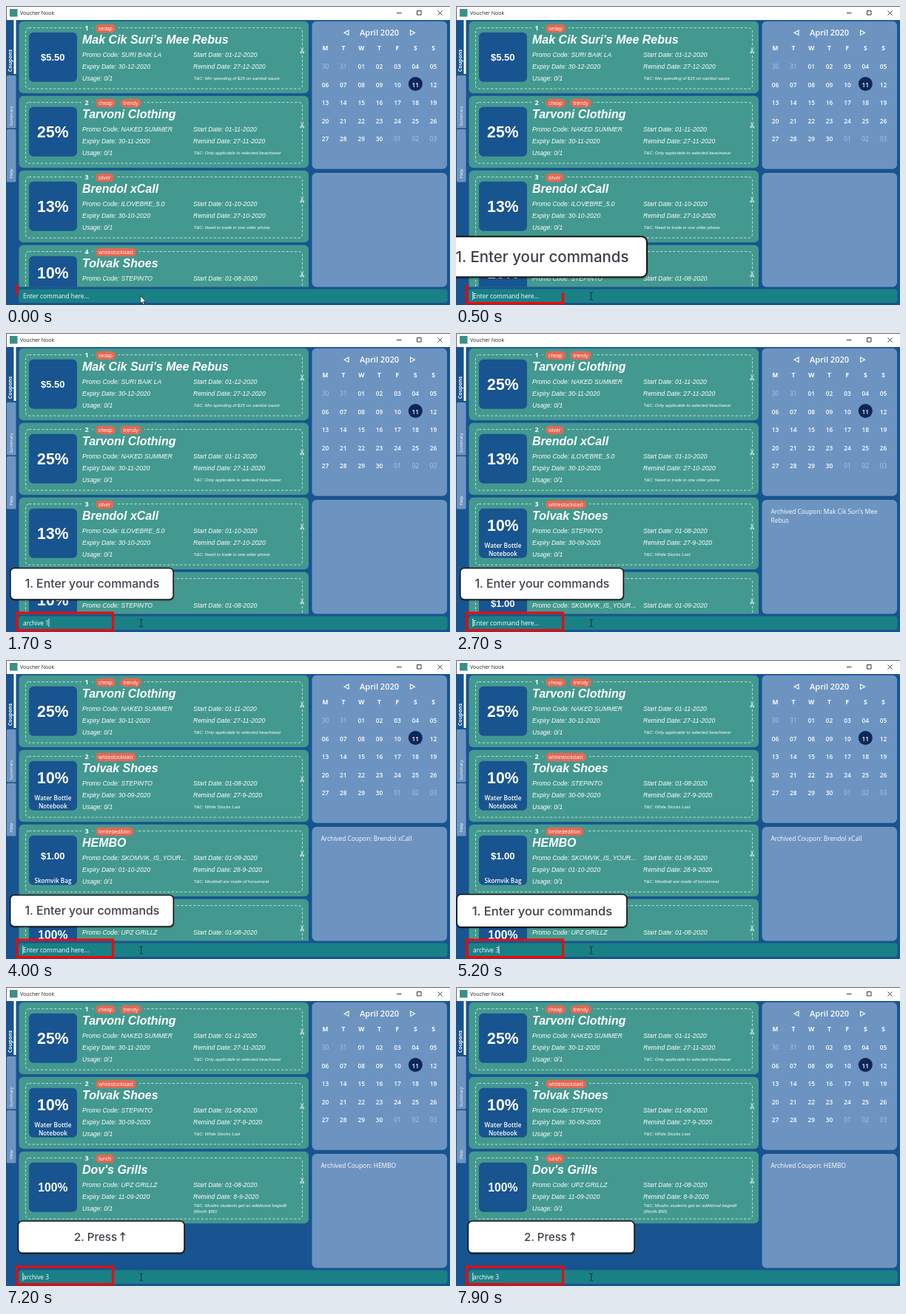
An HTML page for the animation above (8000 ms loop, 600 px wide and 405 px high).

```html
<!DOCTYPE html>
<html lang="en">
<head>
<meta charset="utf-8">
<title>Voucher Nook</title>
<style>
  html, body { margin: 0; width: 100%; height: 100%; overflow: hidden; background: #18548f; }
  svg { display: block; width: 100%; height: 100%; }
  .ui { font-family: "Open Sans", "Noto Sans", sans-serif; }
  .card { font-family: "Liberation Sans", Arial, sans-serif; }
  .tip { font-family: Inter, sans-serif; font-weight: 500; }
  text { white-space: pre; }
</style>
</head>
<body>
<svg id="stage" viewBox="0 0 600 405"></svg>
<script>
const LOOP = 8000, STEP = 100;
const BLUE = '#18548f', GREEN = '#43998f', PANEL = '#6d94c1', RED = '#e26854';
const stage = document.getElementById('stage');
const pen = document.createElement('canvas').getContext('2d');

function el(parent, tag, attrs = {}, content) {
  const node = document.createElementNS('http://www.w3.org/2000/svg', tag);
  for (const key in attrs) node.setAttribute(key, attrs[key]);
  if (content !== undefined) node.textContent = content;
  parent.appendChild(node);
  return node;
}
const group = (parent, attrs) => el(parent, 'g', attrs);
const box = (parent, x, y, width, height, rx, fill, more) =>
  el(parent, 'rect', { x, y, width, height, rx, fill, ...more });
const line = (parent, d, stroke, width, more) =>
  el(parent, 'path', { d, stroke, 'stroke-width': width, fill: 'none', ...more });
const label = (parent, x, y, size, content, more) =>
  el(parent, 'text', { x, y, 'font-size': size, fill: '#fff', ...more }, content);
const show = (node, on) => node.setAttribute('display', on ? 'inline' : 'none');

function uiWidth(text, size) {
  pen.font = '100px "Open Sans", "Noto Sans", sans-serif';
  return pen.measureText(text).width * size / 100;
}

const MID = { 'text-anchor': 'middle' };
const BOLD = { 'font-weight': 700 };
const SEMI = { 'font-weight': 600 };
const ITALIC = { 'font-style': 'italic' };

const coupons = {
  rice: { name: "Mak Cik Suri's Mee Rebus", save: '$5.50', size: 13, tags: ['sedap'], code: 'SURI BAIK LA',
    start: '01-12-2020', end: '30-12-2020', remind: '27-12-2020', terms: ['Min spending of $15 on sambal sauce'] },
  wear: { name: 'Tarvoni Clothing', save: '25%', size: 21.2, tags: ['cheap', 'trendy'], code: 'NAKED SUMMER',
    start: '01-11-2020', end: '30-11-2020', remind: '27-11-2020', terms: ['Only applicable to selected beachwear'] },
  phone: { name: 'Brendol xCall', save: '13%', size: 21.2, tags: ['silver'], code: 'ILOVEBRE_5.0',
    start: '01-10-2020', end: '30-10-2020', remind: '27-10-2020', terms: ['Need to trade in one older phone'] },
  shoes: { name: 'Tolvak Shoes', save: '10%', size: 21.2, gifts: ['Water Bottle', 'Notebook'], tags: ['whilestockslast'],
    code: 'STEPINTO', start: '01-08-2020', end: '30-09-2020', remind: '27-9-2020', terms: ['While Stocks Last'] },
  home: { name: 'HEMBO', save: '$1.00', size: 13, gifts: ['Skomvik Bag'], tags: ['limitededition'],
    code: 'SKOMVIK_IS_YOUR...', start: '01-09-2020', end: '01-10-2020', remind: '28-9-2020',
    terms: ['Meatball are made of horsemeat'] },
  grill: { name: "Dov's Grills", save: '100%', size: 15.7, tags: ['lunch'], code: 'UPZ GRILLZ',
    start: '01-08-2020', end: '11-09-2020', remind: '8-9-2020',
    terms: ['Muslim students get an additional begedil', '(Worth $50)'] }
};

function scissors(parent, x, y) {
  const g = group(parent, { transform: `translate(${x} ${y}) scale(.8)`, stroke: '#fff', fill: 'none', 'stroke-width': 1 });
  el(g, 'path', { d: 'M-2.2 -4.6L1.5 2.6M2.2 -4.6L-1.5 2.6' });
  for (const side of [-1, 1]) el(g, 'circle', { cx: side * 2, cy: 3.7, r: 1.2 });
}

function drawCard(parent, c, slot) {
  const g = group(parent, { transform: `translate(0 ${21 + slot * 101})` });
  box(g, 17.5, -0.3, 391.5, 97.5, 6, GREEN);
  box(g, 26.5, 8.6, 374, 82.5, 4.5, 'none',
    { stroke: '#e4f2ef', 'stroke-width': 0.8, 'stroke-dasharray': '3.2 2.5' });
  box(g, 102, 5, 13, 9, 0, GREEN);
  label(g, 109, 11.7, 9, slot + 1, { ...MID, ...BOLD, class: 'ui' });

  let x = 121;
  for (const tag of c.tags) {
    const w = uiWidth(tag, 6.7) + 8;
    box(g, x - 3, 4, w + 7, 11, 0, GREEN);
    box(g, x, 3.7, w, 11.5, 5.5, RED);
    label(g, x + w / 2, 11.6, 6.7, tag, { ...MID, class: 'ui' });
    x += w + 6.5;
  }

  box(g, 31, 14.7, 65, 67, 6, BLUE);
  const gifts = c.gifts || [];
  const mid = gifts.length === 2 ? 37.3 : gifts.length ? 42.3 : 48.8;
  label(g, 63.3, mid + c.size * 0.36, c.size, c.save, { ...MID, ...BOLD });
  gifts.forEach((gift, i) =>
    label(g, 63.5, 79 - (gifts.length - 1 - i) * 11.5, 8.2, gift, { ...MID, ...SEMI, class: 'ui' }));

  label(g, 103, 29.8, 16, c.name, { ...BOLD, ...ITALIC });
  [[103, 48, 'Promo Code: ' + c.code], [253, 48, 'Start Date: ' + c.start],
   [103, 64, 'Expiry Date: ' + c.end], [253, 64, 'Remind Date: ' + c.remind],
   [103, 79.8, 'Usage: 0/1']].forEach(([tx, ty, s]) => label(g, tx, ty, 8.5, s, ITALIC));
  const top = c.terms.length > 1 ? 75.3 : 79;
  c.terms.forEach((s, i) => label(g, 253.5, top + i * 7.3, 6, (i ? '' : 'T&C: ') + s, ITALIC));

  box(g, 398, 35, 5, 9, 0, GREEN);
  scissors(g, 400.2, 39);
}

function drawFrame() {
  box(stage, 0, 0, 600, 405, 0, BLUE);
  box(stage, 0, 0, 600, 19, 0, '#fff');
  line(stage, 'M0.5 19V0.5H600', '#666', 1);
  box(stage, 5, 4, 10.5, 10.5, 0, '#3b8f88');
  label(stage, 19, 12.2, 7, 'Voucher Nook', { fill: '#222', class: 'ui' });
  line(stage, 'M528 9.5h6.5M555.5 6.5h5.5v5.5h-5.5zM583.5 6.5l6 6m0-6l-6 6', '#222', 0.9);

  [[94, 'Summary', 149], [167, 'Help', 227]].forEach(([y, name, cy]) => {
    box(stage, 1, y, 12.5, 71.5, 1.5, PANEL);
    label(stage, 0, 0, 6, name, { ...MID, class: 'ui', transform: `translate(9.3 ${cy}) rotate(-90)` });
  });
  box(stage, 10.5, 19, 3, 73, 0, '#fff');
  label(stage, 0, 0, 7, 'Coupons', { ...MID, ...BOLD, class: 'ui', transform: 'translate(8.2 74) rotate(-90)' });
}

function drawCalendar() {
  const g = group(stage, { class: 'ui' });
  box(g, 413.5, 20.7, 182.5, 200, 6, PANEL);
  box(g, 413.5, 226, 182.5, 154.5, 6, PANEL);
  label(g, 504.5, 40, 11, 'April 2020', { ...MID, ...SEMI });
  line(g, 'M463 33v6.4l-6-3.2zM546.5 33v6.4l6-3.2z', '#fff', 1.1);
  const colX = i => 431.5 + i * 24.35;
  [...'MTWTFSS'].forEach((d, i) => label(g, colX(i), 60, 8.4, d, { ...MID, ...BOLD }));
  el(g, 'circle', { cx: 553.3, cy: 105.5, r: 9.5, fill: '#0b2757' });
  for (let i = 0; i < 35; i++) {
    const day = i - 1;
    const inside = day >= 1 && day <= 30;
    const num = day < 1 ? day + 31 : day > 30 ? day - 30 : day;
    label(g, colX(i % 7), 85 + Math.floor(i / 7) * 24.5, 8.3, String(num).padStart(2, '0'),
      { ...MID, 'font-weight': inside ? 600 : 400, opacity: inside ? 1 : 0.45 });
  }
}

// Each entry: start time, coupons listed, reply lines
const phases = [
  [0, ['rice', 'wear', 'phone', 'shoes'], []],
  [1900, ['wear', 'phone', 'shoes', 'home'], ["Archived Coupon: Mak Cik Suri's Mee", 'Rebus']],
  [4000, ['wear', 'shoes', 'home', 'grill'], ['Archived Coupon: Brendol xCall']],
  [5300, ['wear', 'shoes', 'grill'], ['Archived Coupon: HEMBO']]
];

// Start time and text in the command field
const typed = [
  [0, ''], [600, 'a'], [700, 'ar'], [900, 'arc'], [1000, 'arch'], [1100, 'archi'], [1200, 'archiv'],
  [1300, 'archive'], [1500, 'archive '], [1600, 'archive 1'], [1900, ''],
  [3000, 'a'], [3100, 'ar'], [3200, 'arc'], [3300, 'arch'], [3400, 'archi'], [3500, 'archiv'],
  [3700, 'archive '], [3800, 'archive 2'], [4000, ''],
  [4500, 'ar'], [4600, 'arch'], [4700, 'archiv'], [4800, 'archive'], [5000, 'archive '],
  [5100, 'archive 3'], [5300, ''], [6600, 'archive 3']
];
const lastAt = (rows, t) => rows.filter(row => row[0] <= t).pop();

drawFrame();
drawCalendar();

const clip = el(el(stage, 'defs'), 'clipPath', { id: 'list' });
box(clip, 0, 19, 412, 361.5, 0, '#000');
const views = phases.map(([, names, reply]) => {
  const view = group(stage);
  const list = group(view, { class: 'card', 'clip-path': 'url(#list)' });
  names.forEach((name, i) => drawCard(list, coupons[name], i));
  reply.forEach((s, i) => label(view, 425.5, 245 + i * 11.5, 8.4, s, { class: 'ui' }));
  return view;
});

box(stage, 17, 383.5, 579.5, 18.5, 4, '#198086');
const command = label(stage, 23, 395.8, 8.4, '', { class: 'ui' });
const caret = box(stage, 0, 387, 0.9, 11, 0, '#fff');

function makeTip(draw) {
  const tip = group(stage, { class: 'tip' });
  box(tip, -110.5, -20.5, 222, 44, 6, '#000', { opacity: 0.22 });
  box(tip, -110.3, -21.3, 220.6, 42.6, 5.5, '#fff', { stroke: '#111', 'stroke-width': 1.5 });
  draw(tip);
  return tip;
}
const ink = { fill: '#3d4049' };
const enterTip = makeTip(tip => label(tip, 0.4, 5.6, 15.9, '1. Enter your commands', { ...MID, ...ink }));
const pressTip = makeTip(tip => {
  label(tip, -36, 5.6, 14.8, '2. Press', ink);
  line(tip, 'M28.5 5.5V-5.5M25.6 -2.5L28.5 -5.8L31.4 -2.5', '#3d4049', 1.4);
});

const EDGE = 312;
const mark = line(stage, 'M14.5 377.3V402.7H144.5V379H13', '#f00808', 3.2);
const arrow = el(stage, 'path', { d: 'M181.5 392.5v10.5l2.4-2.2 1.7 3.8 1.7-.7-1.7-3.7h3.3z',
  fill: '#fff', stroke: '#111', 'stroke-width': 0.7 });
const beam = line(stage, 'M180.3 388.2h1.7l.7.6.7-.6h1.7M182.7 388.8v8.4M180.3 397.8h1.7l.7-.6.7.6h1.7', '#14282c', 0.9);

const spring = ms => ms <= 0 ? 0 : 1 - Math.exp(-2.95 * ms / 1000) * Math.cos(2 * Math.PI * ms / 900);
const backIn = p => 1 - (2.1 * p ** 3 - 1.1 * p ** 2);

function place(tip, x, y, scale) {
  show(tip, scale > 0.01);
  tip.setAttribute('transform', `translate(${x} ${y}) scale(${scale})`);
}

function render(t) {
  const phase = phases.indexOf(lastAt(phases, t));
  views.forEach((view, i) => show(view, i === phase));

  const text = lastAt(typed, t)[1];
  command.textContent = text || 'Enter command here...';
  const recalled = t >= 6600;
  caret.setAttribute('x', 22.4 + (recalled ? 0 : uiWidth(text, 8.4)));
  show(caret, t >= 200 && !(t >= 5800 && t < 6300));

  const drawn = Math.min(EDGE, 14 + t * 0.312);
  mark.setAttribute('stroke-dasharray', drawn < EDGE ? `${drawn} 400` : 'none');
  show(arrow, t < 200);
  show(beam, t >= 200);

  const leaving = Math.min(1, Math.max(0, (t - 5000) / 500));
  place(enterTip, 116, 339.7, spring(t - 90) * backIn(leaving));
  place(pressTip, 128.7, 338.7, spring(t - 6543));
}

const began = performance.now();
function tick() {
  const t = (performance.now() - began) % LOOP;
  render(Math.floor(t / STEP) * STEP);
  requestAnimationFrame(tick);
}
tick();
</script>
</body>
</html>
```
